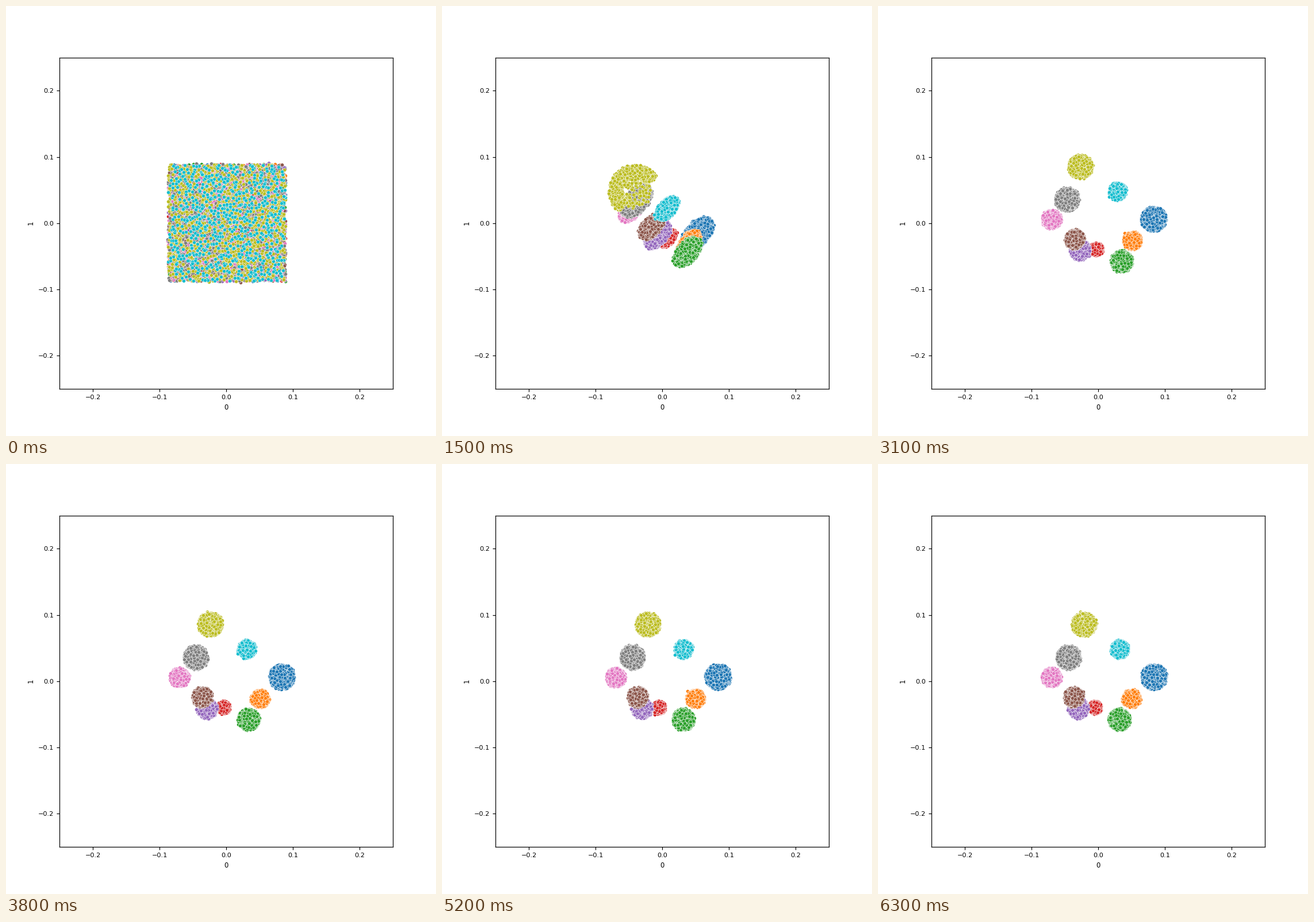
A matplotlib script for the animation above (6400 ms loop, 748x748 px).

```python
import numpy as np
import matplotlib.pyplot as plt
from matplotlib.animation import FuncAnimation

SIZE, DPI = 748, 100
FRAMES, STEP = 64, 100
PT = 72 / DPI  # points per pixel
MID = np.array([384, 377])
ARC = 8        # the class that first unrolls as an open arc

# Resting place of each class in stage pixels: centre x, centre y, radius
HOMES = [
    (480, 370, 21), (441, 408, 15), (420, 444, 18), (377, 423, 11),
    (348, 425, 17), (340, 405, 16), (302, 371, 16), (331, 336, 20),
    (358, 279, 20), (420, 322, 15),
]
# Early on the layout is squeezed towards the falling diagonal
SQUEEZE = np.array([[0.64, 0.29], [0.25, 0.62]])
LEAN = 0.06    # sideways shear that slowly straightens

plt.rcParams["font.family"] = "DejaVu Sans"
plt.rcParams["axes.linewidth"] = 1.22 * PT
fig, ax = plt.subplots(figsize=(SIZE / DPI, SIZE / DPI), dpi=DPI)
fig.subplots_adjust(left=0.1249)
ax.set(xlim=(-0.25, 0.25), ylim=(-0.25, 0.25))
ax.set_xticks(np.arange(-2, 3) / 10)
ax.set_yticks(np.arange(-2, 3) / 10)
ax.tick_params(length=5.35 * PT, width=1.22 * PT, pad=5.35 * PT,
               labelsize=11.2 * PT)
ax.set_xlabel("0", fontsize=11.6 * PT, labelpad=6 * PT)
ax.set_ylabel("1", fontsize=11.6 * PT, labelpad=6 * PT)


def ramp(t, start, end):
    return float(np.clip((t - start) / (end - start), 0, 1))


def smooth(t, start, end):
    x = ramp(t, start, end)
    return x * x * (3 - 2 * x)


def polar(radius, degrees):
    """Offsets in stage pixels, y pointing down."""
    a = np.radians(degrees)
    return np.column_stack([radius * np.cos(a), -radius * np.sin(a)])


def to_data(px):
    box = ax.get_position()
    x = (px[:, 0] / SIZE - box.x0) / box.width
    y = (1 - px[:, 1] / SIZE - box.y0) / box.height
    return np.column_stack([x, y]) * 0.5 - 0.25


class Cloud:
    """One class: a square that shrinks, splits off and settles as a disc."""

    def __init__(self, k, rng):
        *home, r = HOMES[k]
        n = int(3.2 * r * r)
        u = rng.uniform(-1, 1, (n, 2))
        disc = u * (np.abs(u).max(1) / np.hypot(*u.T))[:, None]
        disc += rng.normal(0, 0.04, (n, 2))
        out = np.array(home) - MID

        self.square = MID + u * 101.5 + rng.normal(0, 0.8, (n, 2))
        self.blob = MID - [1, 1] + 0.03 * out + (15 + 2.25 * r) * (0.4 * u + 0.6 * disc)

        centre = MID + SQUEEZE @ out
        along, across = polar(np.array([1.65, 0.95]) * r, np.array([48, 138]))
        self.split = centre + disc[:, :1] * along + disc[:, 1:] * across
        if k == ARC:
            arc = centre + [-3, 12] + polar(34 + 11 * u[:, 1], 132 - 98 * u[:, 0])
            stray = rng.random((n, 1)) < 0.08
            self.split = np.where(stray, centre + [-3, 15] + 26 * disc, arc)
            self.split += rng.normal(0, 1, (n, 2))

        self.home = home + r * disc
        self.lean = np.array([LEAN * out[1], 0])
        self.phase = rng.uniform(0, 2 * np.pi, (n, 2))
        self.rate = rng.uniform(2, 6, (n, 2))
        self.sway = np.where(rng.random((n, 1)) < 0.008, 2.5, 0.8)
        self.dots = ax.scatter(u[:, 0], u[:, 1], s=(6 * PT) ** 2, color=f"C{k}",
                               edgecolors="white", linewidths=0.5 * PT,
                               zorder=2 + k / 100)

    def place(self, t):
        p = self.square + (self.blob - self.square) * ramp(t, 0, 0.6)
        p = p + (self.split - p) * smooth(t, 0.6, 1.5)
        home = self.home + self.lean * (1 - smooth(t, 3.1, 4.4))
        p = p + (home - p) * (1 - np.exp(-max(t - 1.5, 0) / 0.35))
        wobble = self.sway * np.sin(self.rate * t + self.phase)
        self.dots.set_offsets(to_data(p + wobble * ramp(t, 0, 0.6)))


rng = np.random.default_rng(7)
clouds = [Cloud(k, rng) for k in range(len(HOMES))]


def draw(i):
    for cloud in clouds:
        cloud.place(i * STEP / 1000)
    return [cloud.dots for cloud in clouds]


anim = FuncAnimation(fig, draw, frames=FRAMES, interval=STEP, repeat=True,
                     repeat_delay=0)
plt.show()
```
